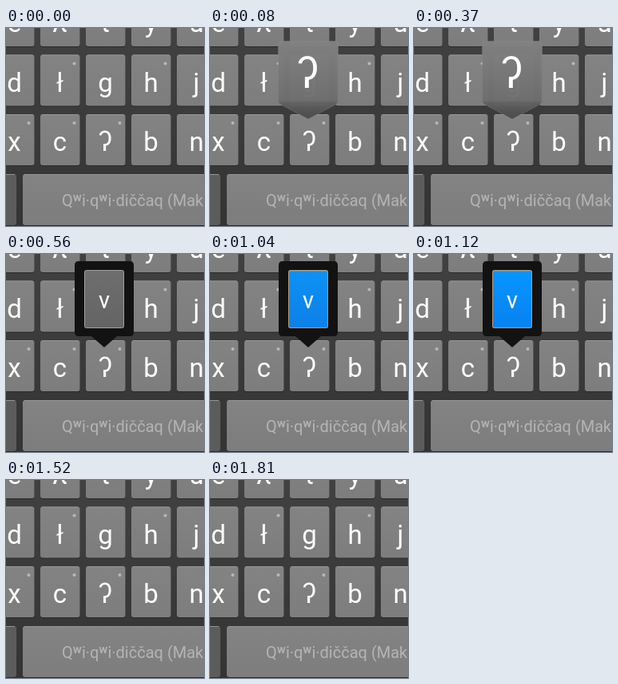
An HTML page that plays this animation: 248 px wide and 248 px high, repeating every 2000 ms.

```html
<!DOCTYPE html>
<html lang="en">
<head>
<meta charset="utf-8">
<title>Long-press keyboard</title>
<style>
html, body { margin: 0; width: 100%; height: 100%; overflow: hidden; background: #3c3c3c; }
svg { display: block; width: 100vw; height: 100vh; }
text { font-family: Roboto, "Noto Sans", sans-serif; fill: #fff; text-anchor: middle; }
.letter { font-size: 33px; }
.space { font-size: 20px; fill: #b4b4b4; text-anchor: start; }
.preview, .popup, .press { visibility: hidden; animation: 2s step-end infinite; }
.preview { animation-name: preview; }
.popup { animation-name: popup; }
.press { animation-name: press; }
@keyframes preview { 0% { visibility: hidden } 4% { visibility: visible } 28%, 100% { visibility: hidden } }
@keyframes popup { 0% { visibility: hidden } 28% { visibility: visible } 76%, 100% { visibility: hidden } }
@keyframes press {
  0% { visibility: hidden; opacity: .94 }
  52% { visibility: visible; opacity: .94 }
  56% { visibility: visible; opacity: 1 }
  76%, 100% { visibility: hidden; opacity: 1 }
}
</style>
</head>
<body>
<svg viewBox="0 0 248 248">
  <defs>
    <linearGradient id="board" x2="0" y2="1"><stop stop-color="#414141"/><stop offset="1" stop-color="#343434"/></linearGradient>
    <linearGradient id="key" x2="0" y2="1"><stop stop-color="#838383"/><stop offset="1" stop-color="#7d7d7d"/></linearGradient>
    <linearGradient id="bubble" x2="0" y2="1">
      <stop stop-color="#828282"/><stop offset=".76" stop-color="#6e6e6e"/>
      <stop offset=".79" stop-color="#626262"/><stop offset="1" stop-color="#484848"/>
    </linearGradient>
    <linearGradient id="blue" x2="0" y2="1"><stop stop-color="#0795ff"/><stop offset="1" stop-color="#0782f0"/></linearGradient>
    <linearGradient id="idle" x2="0" y2="1"><stop stop-color="#6e6e6e"/><stop offset="1" stop-color="#646464"/></linearGradient>
  </defs>
  <rect width="248" height="248" fill="url(#board)"/>
  <g id="keys"></g>
  <text class="space" x="70" y="223">Qʷi·qʷi·diččaq (Makah)</text>

  <g class="preview">
    <path d="M89 16.5H157Q160.500 16.500 160.500 20V91Q160.500 94 157 96L123 114L89 96Q85.500 94 85.500 91V20Q85.500 16.500 89 16.500Z" fill="url(#bubble)" fill-opacity=".97" stroke="#8a8a8a" stroke-opacity=".35"/>
    <text x="122.500" y="75" font-size="52">ʔ</text>
  </g>

  <g class="popup">
    <path d="M91 9H155Q160 9 160 14V98Q160 103 155 103H139L123 117L107 103H91Q86 103 86 98V14Q86 9 91 9Z" fill="#121212"/>
    <rect x="98.500" y="20.500" width="49" height="72" rx="2" fill="url(#idle)" stroke="#a0a0a0"/>
    <rect class="press" x="98.500" y="21" width="49" height="71.500" rx="2" fill="url(#blue)" stroke="#b59a78"/>
    <text x="123" y="68" font-size="29">v</text>
  </g>
</svg>
<script>
const keys = document.getElementById("keys");

function add(tag, attrs, text = "") {
  const node = document.createElementNS("http://www.w3.org/2000/svg", tag);
  for (const name in attrs) node.setAttribute(name, attrs[name]);
  node.textContent = text;
  keys.append(node);
}

function addKey(x, y, width, fill = "url(#key)") {
  add("rect", { x, y: y + 1, width, height: 64, rx: 3, fill: "#272727" });
  add("rect", { x, y, width, height: 64, rx: 3, fill });
  add("rect", { x: x + 2, y, width: width - 4, height: 1, fill: "#969696" });
}

// Each row: letters, top edge, and columns carrying a long-press dot.
const rows = [["eƛtyu", -41, []], ["dłghj", 33.5, [1, 3]], ["xcʔbn", 108, [0, 1, 2]]];
for (const [letters, top, dots] of rows) {
  [...letters].forEach((letter, col) => {
    const left = -14 + col * 57;
    addKey(left, top, 49.500);
    add("text", { class: "letter", x: left + 24.5, y: top + 46 }, letter);
    if (dots.includes(col)) add("circle", { cx: left + 42.5, cy: top + 11, r: 2, fill: "#b8b8b8" });
  });
}
addKey(-40, 183, 53, "#5c5c5c");
addKey(21, 183, 250);
</script>
</body>
</html>
```
